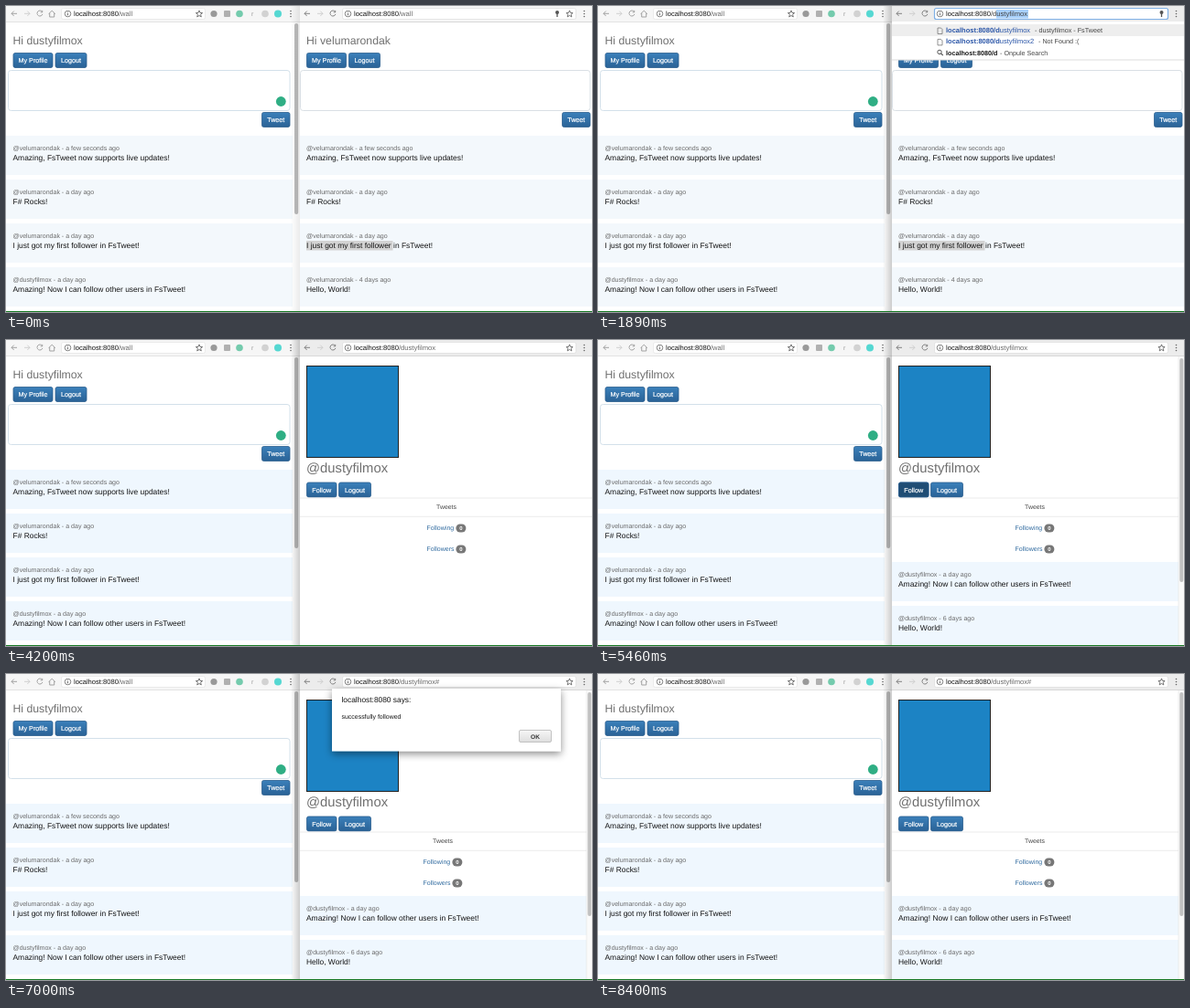
Animation, 640 px wide and 335 px high, one loop 8.47 s. Source, as an HTML page:

```html
<!DOCTYPE html>
<html lang="en">
<head>
<meta charset="utf-8">
<title>Live wall</title>
<style>
  html, body { margin: 0; width: 100%; height: 100%; overflow: hidden; background: #fff; }
  svg { display: block; width: 640px; height: 335px; }
  text { font-family: "Liberation Sans", Arial, sans-serif; text-rendering: geometricPrecision; white-space: pre; }
</style>
</head>
<body>
<svg id="stage" viewBox="0 0 640 335" xmlns="http://www.w3.org/2000/svg"></svg>
<script>
const LOOP = 8470, STEP = 70;
const ME = 'dustyfilmox', OTHER = 'velumarondak', HOST = 'localhost:8080';
const INK = '#141414', MUTED = '#6a6a6a', BLUE = '#2f6a9f';

const text = (x, y, size, fill, body, extra = '') =>
  `<text x="${x}" y="${y}" font-size="${size}" fill="${fill}" ${extra}>${body}</text>`;
const rect = (x, y, w, h, fill, extra = '') =>
  `<rect x="${x}" y="${y}" width="${w}" height="${h}" fill="${fill}" ${extra}/>`;
const circle = (x, y, r, fill, extra = '') =>
  `<circle cx="${x}" cy="${y}" r="${r}" fill="${fill}" ${extra}/>`;
const line = (d, stroke = '#666', width = 0.9) =>
  `<path d="${d}" fill="none" stroke="${stroke}" stroke-width="${width}"/>`;
const group = (id, body) => `<g id="${id}">${body}</g>`;
const centred = 'text-anchor="middle"';

const button = (x, y, w, label, fill = 'url(#blue)') =>
  rect(x + .5, y + .5, w - 1, 16, fill, 'rx="2" stroke="#2b5f8e" stroke-width=".8"') +
  text(x + w / 2, y + 11, 7.2, '#fff', label, centred + ' stroke="#fff" stroke-width=".2"');

const post = (x, y, w, [who, when, body]) =>
  rect(x > 300 ? 321 : 0, y, w, 43, '#eff7fe', 'class="band"') +
  text(x, y + 15.6, 7.05, MUTED, `@${who} - ${when}`) +
  text(x, y + 27.2, 8.43, INK, body);

const posts = (x, y, w, list) => list.map((p, i) => post(x, y + 48 * i, w, p)).join('');

function wall(x, user, list) {
  const left = x < 300, boxX = left ? 2.5 : 321.5, boxW = left ? 307.5 : 316.5;
  return text(x, 41.8, 12.26, '#707070', `Hi ${user}`) +
    button(x, 51, 44, 'My Profile') + button(x + 46, 51, 35, 'Logout') +
    rect(boxX, 70.5, boxW, 44, '#fff', `rx="3" stroke="${left ? '#d3e0ea' : '#d9dfe4'}"`) +
    button(left ? 279 : 607, 116, 31.5, 'Tweet') +
    posts(x, 142, left ? 313 : 319, list);
}

const info = x => circle(x, 8.5, 3.3, 'none', 'stroke="#666" stroke-width=".8"') +
  line(`M${x} 8v2.3M${x} 6.4v.9`);
const star = x => line(`M${x} 4.9l1 2.5 2.6.2-2 1.7.7 2.6-2.3-1.4-2.3 1.4.7-2.6-2-1.7 2.6-.2z`, '#555', .8);
const key = x => circle(x, 6.9, 2, '#555') + line(`M${x} 7v5`, '#555', 1.3);
const kebab = x => [5.5, 8.5, 11.5].map(y => circle(x, y, .8, '#666')).join('');
const nav = (x, ink) =>
  line(`M${x + 3} 8.3h-6m2.7-2.7l-2.7 2.7 2.7 2.7`, ink) +
  line(`M${x + 11} 8.3h6m-2.7-2.7l2.7 2.7-2.7 2.7`, '#ccc') +
  line(`M${x + 30.5} 6.3a3 3 0 1 0 .4 2.6m-.2-4v2h-2`, ink);
const address = (x, tail, fill = MUTED) =>
  text(x, 11, 7.6, INK, `${HOST}<tspan fill="${fill}">/${tail}</tspan>`);

const feed = [
  [OTHER, 'a few seconds ago', 'Amazing, FsTweet now supports live updates!'],
  [OTHER, 'a day ago', 'F# Rocks!'],
  [OTHER, 'a day ago', 'I just got my first follower in FsTweet!'],
];
const amazing = [ME, 'a day ago', 'Amazing! Now I can follow other users in FsTweet!'];
const hello = (who, when) => [who, when, 'Hello, World!'];

const leftWindow =
  rect(0, 0, 321, 17, '#f6f6f6') + rect(0, 17, 321, .8, '#ddd') +
  nav(9, '#999') + line('M46.5 8.7l3.7-3.5 3.7 3.5M47.7 8v4h5V8', '#999') +
  rect(60.5, 2.5, 157, 12, '#fff', 'rx="2" stroke="#e4e4e4" stroke-width=".7"') +
  info(67.5) + address(74, 'wall') + star(211) +
  circle(227, 8.5, 3.6, '#999') + rect(238, 5, 7, 7, '#b0b0b0', 'rx="1"') +
  circle(255, 8.5, 3.8, '#74cbad') + text(268, 11, 7, '#999', 'r') +
  circle(283, 8.5, 3.8, '#d2d2d2') + circle(297, 8.5, 4, '#55d8d2') + kebab(311) +
  wall(7.5, ME, [...feed, amazing]) + circle(300.3, 104.5, 5.4, '#2fae84') +
  rect(315, 19, 4.2, 209, '#bdbdbd', 'rx="2"');

const badge = (x, y) => rect(x, y - 4.5, 11, 9, '#777', 'rx="4.5"') +
  text(x + 5.5, y + 2.2, 6, '#fff', '0', centred + ' font-weight="bold"');
const tab = (y, label) => text(459.6, y + 2.2, 7, BLUE, label) + badge(491.4, y);

const profile =
  group('alt', text(327.5, 34.6, 8.4, INK, '.')) +
  group('avatar', rect(328.5, 28.5, 100, 100, '#1c83c4', 'stroke="#222"')) +
  group('details',
    text(328, 54.3, 14.8, '#707070', '@' + ME) +
    group('follow', button(328, 64.5, 33.5, 'Follow')) +
    group('pressed', button(328, 64.5, 33.5, 'Follow', '#204d74')) +
    button(363, 64.5, 36, 'Logout') +
    line('M321 82H640M321 102.3H640', '#e6e6e6', .8) +
    group('tabs', text(481, 94.1, 6.9, '#444', 'Tweets', centred) +
      tab(115, 'Following') + tab(138, 'Followers'))) +
  group('ownPosts', posts(328, 243, 313, [amazing, hello(ME, '6 days ago')]) +
    rect(634, 18, 6, 317, '#fafafa') + line('M634 18V335', '#e6e6e6', .7) +
    rect(635.3, 20, 4, 245, '#c1c1c1', 'rx="2"'));

const suggestion = (y, tail, x, note) =>
  line(`M371 ${y - 5}h3.5l1.5 1.5v5h-5z`, '#777', .8) +
  text(380, y, 7.5, '#2b56a8', `<tspan font-weight="bold">${HOST}/d</tspan>${tail}`) +
  text(x, y, 7.2, '#444', note);
const dropdown =
  rect(321, 17, 319, 42, '#fff') + rect(321, 20, 319, 13, '#eee') + rect(321, 58.5, 319, 1, '#ddd') +
  suggestion(29, ME.slice(1), 477, `- ${ME} - FsTweet`) +
  suggestion(41.4, ME.slice(1) + '2', 481, '- Not Found :(') +
  circle(373, 50.4, 2.2, 'none', 'stroke="#555"') + line('M374.6 52l2.2 2.2', '#555', 1.2) +
  text(380, 53.8, 7.2, INK, `${HOST}/d`, 'font-weight="bold"') +
  text(439, 53.8, 7.2, '#444', '- Onpule Search');

const alertBox =
  rect(356, 16, 250, 68.5, '#fff', 'filter="url(#drop)"') +
  text(366.5, 30.7, 8.4, INK, HOST + ' says:') +
  text(366.5, 49.3, 6.96, INK, 'successfully followed') +
  rect(560.5, 61.5, 35, 13, 'url(#grey)', 'rx="1.5" stroke="#b5b5b5" stroke-width=".8"') +
  group('okDown', rect(560.5, 61.5, 35, 13, '#d6d6d6', 'rx="1.5" stroke="#999" stroke-width=".8"')) +
  text(578, 70.5, 6.6, '#333', 'OK', centred + ' font-weight="bold"');

const rightWindow =
  rect(321, 0, 319, 335, '#fff') +
  group('wall', rect(328, 257, 94.5, 10.5, '#d3d3d3', 'id="marked"') + wall(328, OTHER, [...feed, hello(OTHER, '4 days ago')])) +
  group('profile', profile) +
  rect(321, 0, 319, 17, '#f6f6f6') + group('active', rect(321, 0, 319, 17, '#ececec')) +
  rect(321, 17, 319, .8, '#cfcfcf') + nav(329, '#777') +
  rect(367.5, 2.5, 255, 12, '#fff', 'rx="2" stroke="#ddd" stroke-width=".7"') +
  group('focus', rect(367.5, 2.5, 255, 12, 'none', 'rx="2" stroke="#7fb0e6" stroke-width="1.2"')) +
  group('allSelected', rect(380, 4, 64.5, 9.5, '#b5d5fb')) +
  group('tailSelected', rect(431.5, 4, 13, 9.5, '#b5d5fb')) +
  group('autoSelected', rect(435, 4, 35, 9.5, '#a9d1fb')) +
  info(373.5) + group('urlWall', address(380, 'wall')) +
  group('urlTyped', address(380, ME, '#444')) + group('urlUser', address(380, ME)) +
  group('urlHash', address(380, ME + '#')) +
  group('keyLeft', key(602)) + group('keyRight', key(615.5)) + group('star', star(615.5)) + kebab(631.5) +
  group('dropdown', dropdown) + group('alert', alertBox);

document.getElementById('stage').innerHTML = `<defs>
  <linearGradient id="blue" x2="0" y2="1"><stop stop-color="#3b80ba"/><stop offset="1" stop-color="#2a6296"/></linearGradient>
  <linearGradient id="grey" x2="0" y2="1"><stop stop-color="#f6f6f6"/><stop offset="1" stop-color="#dedede"/></linearGradient>
  <linearGradient id="edge"><stop stop-color="#000" stop-opacity="0"/><stop offset="1" stop-color="#000" stop-opacity=".2"/></linearGradient>
  <filter id="drop" x="-10%" y="-20%" width="120%" height="150%"><feDropShadow dx="0" dy="3" stdDeviation="4" flood-opacity=".45"/></filter>
</defs>` + rect(0, 0, 640, 335, '#fff') + leftWindow +
  rect(311, 0, 10, 335, 'url(#edge)', 'id="shade"') + rightWindow +
  rect(0, 334, 640, 1, '#187a25');

const $ = id => document.getElementById(id);
// Keep the selected words readable above their post's band.
$('wall').querySelectorAll('.band')[2].after($('marked'));

// Each part is visible between these times (ms).
const visible = {
  active: [140, LOOP],
  wall: [0, 2940], profile: [2940, LOOP],
  focus: [490, 2100], allSelected: [490, 1120], tailSelected: [1120, 1610],
  autoSelected: [1610, 2100], dropdown: [1610, 2100],
  urlWall: [0, 1610], urlTyped: [1610, 2100], urlUser: [2100, 5670], urlHash: [5670, LOOP],
  keyLeft: [0, 490], keyRight: [490, 2100],
  alt: [2940, 3430], avatar: [3430, LOOP], ownPosts: [4620, LOOP],
  pressed: [5180, 5950], okDown: [8050, 8260], alert: [6440, 8400],
};
const ramp = (t, from, to) => Math.min(1, Math.max(0, (t - from) / (to - from)));

function draw(now) {
  const t = Math.floor((now % LOOP) / STEP) * STEP;
  for (const [id, [from, to]] of Object.entries(visible))
    $(id).style.display = t >= from && t < to ? '' : 'none';
  $('star').style.display = t < 490 || t >= 2100 ? '' : 'none';
  $('shade').setAttribute('opacity', t < 140 ? .4 : 1);
  $('details').setAttribute('transform', `translate(0 ${t < 3430 ? 0 : 91})`);
  $('tabs').setAttribute('transform', `translate(${t < 4620 ? 0 : -4} 0)`);
  $('alert').setAttribute('opacity', Math.min(ramp(t, 6370, 6580), 1 - ramp(t, 8260, 8400)));
  const band = t < 2940 ? '#f3f8fc' : '#eff7fe';
  document.querySelectorAll('.band').forEach(b => b.setAttribute('fill', band));
}

const start = performance.now();
function tick() {
  draw(performance.now() - start);
  requestAnimationFrame(tick);
}
tick();
</script>
</body>
</html>
```
